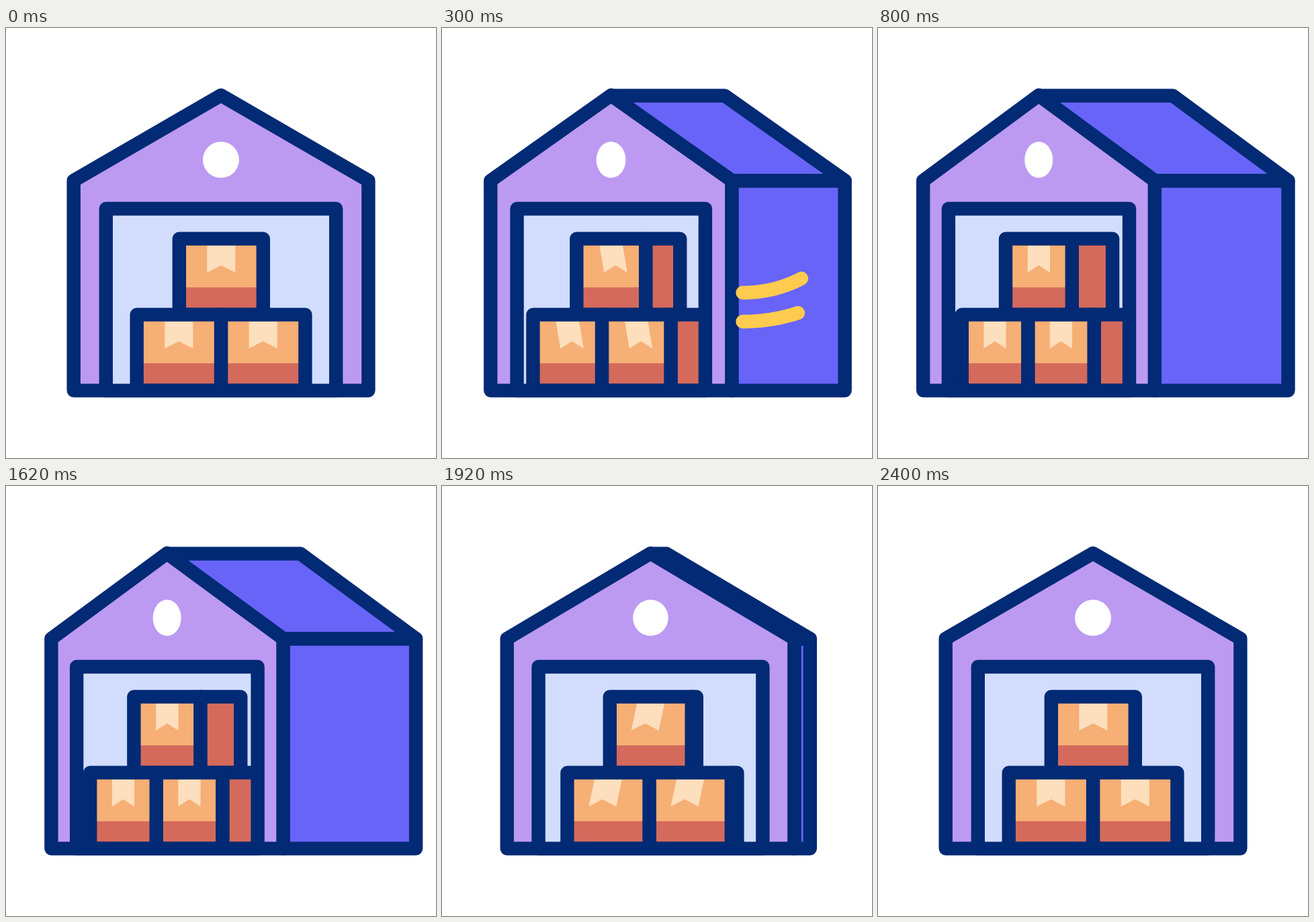
An HTML page with a canvas for the animation above (2.8 s loop, 640 by 640 pixels).

```html
<!DOCTYPE html>
<html lang="en">
<head>
<meta charset="utf-8">
<title>Warehouse</title>
<style>
  html, body { margin: 0; width: 100%; height: 100%; overflow: hidden; background: #fff; }
  canvas { display: block; width: 100vw; height: 100vh; }
</style>
</head>
<body>
<canvas id="stage"></canvas>
<script>
const SIZE = 640, LOOP = 2800, TURN = 533, BACK = 1600;
const NAVY = '#032a74', LILAC = '#bc9af2', BLUE = '#6864f8', SKY = '#d2ddfd';
const ORANGE = '#f6af74', RED = '#d46a5c', CREAM = '#fddfbd', YELLOW = '#ffcb4f';
const TOP = 100.2, EAVES = 227.2, FLOOR = 539.6, LINTEL = 269;

const canvas = document.getElementById('stage');
const ctx = canvas.getContext('2d');
const ratio = window.devicePixelRatio || 1;
canvas.width = canvas.height = SIZE * ratio;

const clamp = v => Math.min(1, Math.max(0, v));
const mix = (a, b, p) => a + (b - a) * p;
const smooth = v => { v = clamp(v); return v * v * (3 - 2 * v); };

function bezier(x1, y1, x2, y2) {
  const at = (s, a, b) => 3 * (1 - s) * (1 - s) * s * a + 3 * (1 - s) * s * s * b + s * s * s;
  return x => {
    if (x <= 0) return 0;
    if (x >= 1) return 1;
    let lo = 0, hi = 1;
    for (let i = 0; i < 30; i++) {
      const mid = (lo + hi) / 2;
      if (at(mid, x1, x2) < x) lo = mid; else hi = mid;
    }
    return at(lo, y1, y2);
  };
}
const turnEase = bezier(0.56, 0.05, 0.16, 1);

// Ribbon sway after a turn starts: trails first, then swings past and settles.
function sway(t) {
  if (t < 340) return 9 * smooth(t / 340);
  if (t < 690) return mix(9, -14.5, smooth((t - 340) / 350));
  return mix(-14.5, 0, smooth((t - 690) / 115));
}

function shape(points, fill, outline) {
  ctx.beginPath();
  points.forEach(([x, y]) => ctx.lineTo(x, y));
  ctx.closePath();
  if (fill) { ctx.fillStyle = fill; ctx.fill(); }
  if (outline) { ctx.strokeStyle = NAVY; ctx.stroke(); }
}

const rect = (l, t, r, b) => [[l, t], [r, t], [r, b], [l, b]];

function crate(left, right, depth, top, p, lean) {
  const bottom = top + 113.1, split = top + 72.3, rim = top + 10;
  const mid = (left + right) / 2, half = mix(21, 16.6, p);
  const dx = lean * mix(1, 0.745, p);
  if (depth > 0.05) shape(rect(right, top, right + depth, bottom), RED, true);
  shape(rect(left, top, right, split), ORANGE);
  shape(rect(left, split, right, bottom), RED);
  shape([
    [mid - half, rim], [mid + half, rim], [mid + half + dx, rim + 40.5],
    [mid + dx, rim + 29.7], [mid - half + dx, rim + 40.5]
  ], CREAM);
  shape(rect(left, top, right, bottom), null, true);
}

// Quadratic stroke showing only the part between a and b.
function streak([x0, y0], [cx, cy], [x1, y1], a, b) {
  if (b - a < 0.01) return;
  const q = (s, u, v, w) => (1 - s) * (1 - s) * u + 2 * s * (1 - s) * v + s * s * w;
  ctx.strokeStyle = YELLOW;
  ctx.beginPath();
  for (let i = 0; i <= 24; i++) {
    const s = mix(a, b, i / 24);
    ctx.lineTo(q(s, x0, cx, x1), q(s, y0, cy, y1));
  }
  ctx.stroke();
}

function draw(t) {
  const returning = t >= BACK;
  const p = returning ? 1 - turnEase((t - BACK) / TURN) : turnEase(t / TURN);
  const lean = returning ? -sway(t - BACK) : sway(t);

  ctx.setTransform(canvas.width / SIZE, 0, 0, canvas.height / SIZE, 0, 0);
  ctx.fillStyle = '#fff';
  ctx.fillRect(0, 0, SIZE, SIZE);
  ctx.lineWidth = 20.4;
  ctx.lineJoin = ctx.lineCap = 'round';

  const left = mix(100.7, 67.2, p), right = mix(539.4, 411.8, p);
  const apex = mix(320, 239.2, p);
  const far = mix(539.4, 610.5, p), ridge = mix(320, 438.8, p);

  if (p > 0.0005) {
    shape(rect(right, EAVES, far, FLOOR), BLUE, true);
    shape([[apex, TOP + 0.5], [ridge, TOP + 0.5], [far, EAVES], [right, EAVES]], BLUE, true);
  }
  shape([[left, FLOOR], [left, EAVES], [apex, TOP], [right, EAVES], [right, FLOOR]], LILAC, true);

  ctx.fillStyle = '#fff';
  ctx.beginPath();
  ctx.ellipse(apex, 196.2, mix(27, 21, p), 26.9, 0, 0, Math.PI * 2);
  ctx.fill();

  const door = rect(mix(148.8, 104.9, p), LINTEL, mix(491.2, 374, p), FLOOR);
  ctx.save();
  shape(door, SKY);
  ctx.clip();
  crate(mix(257.8, 190, p), mix(382.8, 288.8, p), 60.3 * p, 313.6, p, lean);
  const seam = mix(320, 223.2, p), end = mix(445.4, 321.6, p);
  crate(seam, end, 73 * p, 426.6, p, lean);
  crate(mix(194.7, 124.8, p), seam, 0, 426.6, p, lean);
  ctx.restore();
  shape(door, null, true);

  if (!returning) {
    const tail = 1 - smooth((t - 300) / 170);
    const head = 1 - smooth((t - 120) / 170);
    streak([447.5, 394], [494, 394], [535, 372.8], head, tail);
    streak([447.5, 437], [490, 437], [530, 424], head, tail);
  }
}

const start = performance.now();
function tick() {
  draw((performance.now() - start) % LOOP);
  requestAnimationFrame(tick);
}
tick();
</script>
</body>
</html>
```
